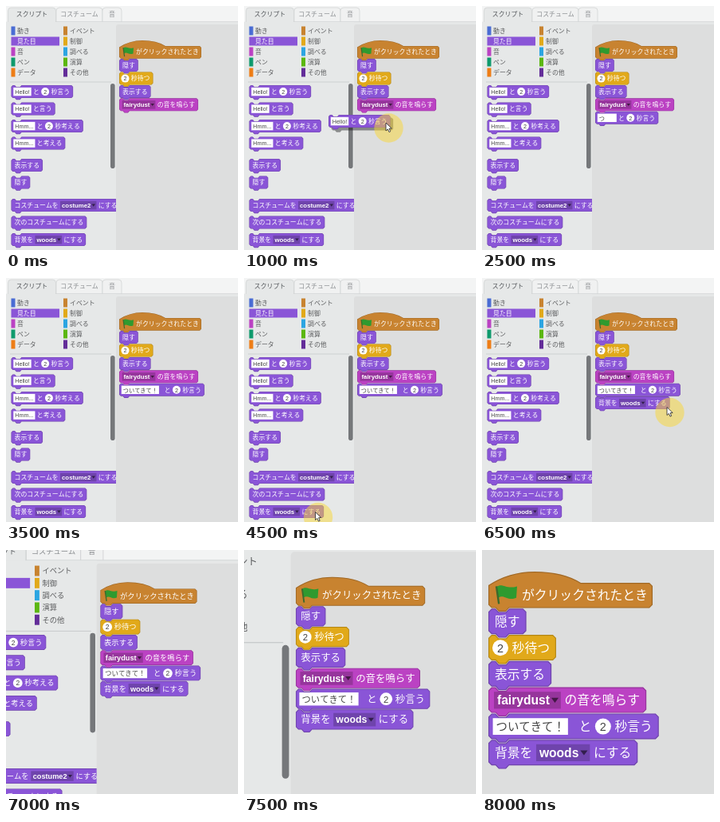
Animation of 291 by 305 pixels, one loop 9500 ms. Source, as an HTML page with a canvas:

```html
<!DOCTYPE html>
<html lang="ja">
<head>
<meta charset="utf-8">
<style>
html, body { margin: 0; width: 100%; height: 100%; overflow: hidden; background: #dddede; }
canvas { display: block; width: 291px; height: 305px; }
</style>
</head>
<body>
<canvas id="stage"></canvas>
<script>
const W = 291, H = 305, STEP = 500, LOOP = 9500;
const canvas = document.getElementById('stage');
const ctx = canvas.getContext('2d');
const dpr = window.devicePixelRatio || 1;
canvas.width = W * dpr;
canvas.height = H * dpr;

const JP = '"Liberation Sans", "Noto Sans CJK JP", "Noto Sans CJK", sans-serif';
const FONT = { label: `500 7.9px ${JP}`, menu: `bold 7.8px ${JP}`, input: `7.2px ${JP}`, ui: `7.9px ${JP}` };
const COLOR = {
  motion: '#4a6cd4', looks: '#8a55d7', sound: '#bb42c3', pen: '#0e9a6c', data: '#ee7d16',
  events: '#c88330', control: '#e1a91a', sensing: '#2ca5e2', operators: '#5cb712', more: '#632d99'
};
const PITCH = 16.4, GAP = 2.3;

function write(str, x, cy, font, color) {
  ctx.font = font;
  ctx.fillStyle = color;
  ctx.fillText(str, x, cy + 2.8);
  return ctx.measureText(str).width;
}

function widthOf(str, font) {
  ctx.font = font;
  return ctx.measureText(str).width;
}

function rect(x, y, w, h, color) {
  ctx.fillStyle = color;
  ctx.fillRect(x, y, w, h);
}

function pill(x, y, w, h, r, color) {
  ctx.beginPath();
  ctx.roundRect(x, y, w, h, r);
  ctx.fillStyle = color;
  ctx.fill();
}

// Block parts: each has a width and a way to draw itself.
const text = s => ({
  inset: 4,
  width: () => widthOf(s, FONT.label),
  draw: (x, cy) => write(s, x, cy, FONT.label, '#fff')
});

const num = s => ({
  inset: 2.5,
  width: () => 10,
  draw(x, cy) {
    pill(x, cy - 5, 10, 10, 5, '#fff');
    write(s, x + 3, cy, FONT.input, '#444');
  }
});

const menu = s => ({
  inset: 3.5,
  width: () => widthOf(s, FONT.menu) + 9,
  draw(x, cy) {
    const w = this.width();
    rect(x, cy - 5.3, w, 10.6, 'rgba(0,0,0,.2)');
    write(s, x + 2, cy, FONT.menu, '#fff');
    ctx.beginPath();
    ctx.moveTo(x + w - 6, cy - 1.5);
    ctx.lineTo(x + w - 1.4, cy - 1.5);
    ctx.lineTo(x + w - 3.7, cy + 1.6);
    ctx.fillStyle = 'rgba(0,0,0,.55)';
    ctx.fill();
  }
});

const field = (s, fixed, extra = 0) => ({
  inset: 2.8,
  box: () => fixed || widthOf(s, FONT.input) + 4,
  width() { return this.box() + extra; },
  draw(x, cy) {
    rect(x, cy - 5.2, this.box(), 10.4, '#fff');
    write(s, x + 2, cy, FONT.input, '#444');
  }
});

function blockPath(x, y, w, h, hat) {
  ctx.beginPath();
  if (hat) {
    ctx.moveTo(x, y + 1.5);
    ctx.quadraticCurveTo(x + 13, y - 7, x + 29, y - 7);
    ctx.quadraticCurveTo(x + 47, y - 7, x + 58, y);
  } else {
    ctx.moveTo(x, y + 2);
    ctx.lineTo(x + 2, y);
    ctx.lineTo(x + 4.5, y);
    ctx.lineTo(x + 6.5, y + 2.2);
    ctx.lineTo(x + 11, y + 2.2);
    ctx.lineTo(x + 13, y);
  }
  ctx.lineTo(x + w - 2, y);
  ctx.lineTo(x + w, y + 2);
  ctx.lineTo(x + w, y + h - 2);
  ctx.lineTo(x + w - 2, y + h);
  ctx.lineTo(x + 13, y + h);
  ctx.lineTo(x + 11, y + h + 2.2);
  ctx.lineTo(x + 6.5, y + h + 2.2);
  ctx.lineTo(x + 4.5, y + h);
  ctx.lineTo(x + 2, y + h);
  ctx.lineTo(x, y + h - 2);
  ctx.closePath();
}

function paintShape(color) {
  ctx.fillStyle = color;
  ctx.fill();
  ctx.save();
  ctx.clip();
  ctx.strokeStyle = 'rgba(0,0,0,.2)';
  ctx.lineWidth = 1.2;
  ctx.stroke();
  ctx.restore();
}

function block(x, y, parts, color = COLOR.looks, lifted = false) {
  const w = parts.reduce((sum, p) => sum + p.width() + GAP, parts[0].inset + 4 - GAP);
  const h = 16;
  if (lifted) {
    blockPath(x + 3.5, y + 3.5, w, h);
    ctx.fillStyle = 'rgba(0,0,0,.4)';
    ctx.fill();
  }
  blockPath(x, y, w, h);
  paintShape(color);
  let px = x + parts[0].inset;
  for (const p of parts) {
    p.draw(px, y + 8.1);
    px += p.width() + GAP;
  }
}

function hatBlock(x, y) {
  blockPath(x, y, 103, 15.8, true);
  paintShape(COLOR.events);
  ctx.save();
  ctx.translate(x + 5, y + 1.2);
  ctx.beginPath();
  ctx.moveTo(0, 1.4);
  ctx.bezierCurveTo(4, -1.6, 6, 3.2, 13, 1);
  ctx.lineTo(12.5, 8.2);
  ctx.bezierCurveTo(7, 10.4, 5, 5.8, 1.4, 8);
  ctx.closePath();
  ctx.fillStyle = '#2f9a2f';
  ctx.fill();
  ctx.beginPath();
  ctx.moveTo(0, 1);
  ctx.lineTo(1.6, 12);
  ctx.strokeStyle = '#3c6a2c';
  ctx.lineWidth = 1.2;
  ctx.stroke();
  ctx.restore();
  write('がクリックされたとき', x + 21, y + 7.6, FONT.label, '#fff');
}

const sayFor = f => [f, text('と'), num('2'), text('秒言う')];
const HELLO = sayFor(field('Hello!'));
const WOODS = [text('背景を'), menu('woods'), text('にする')];
const PALETTE = [
  [99, HELLO],
  [120.5, [field('Hello!'), text('と言う')]],
  [142, [field('Hmm...'), text('と'), num('2'), text('秒考える')]],
  [163.5, [field('Hmm...'), text('と考える')]],
  [191, [text('表示する')]],
  [212.5, [text('隠す')]],
  [241, [text('コスチュームを'), menu('costume2'), text('にする')]],
  [262.5, [text('次のコスチュームにする')]],
  [284, WOODS]
];
const CATEGORIES = [
  ['動き', 'motion', 'イベント', 'events'],
  ['見た目', 'looks', '制御', 'control'],
  ['音', 'sound', '調べる', 'sensing'],
  ['ペン', 'pen', '演算', 'operators'],
  ['データ', 'data', 'その他', 'more']
];

function tab(x, w, label, active) {
  ctx.beginPath();
  ctx.roundRect(x, 2, w, 19, [4, 4, 0, 0]);
  ctx.fillStyle = active ? '#e6e8e8' : '#f0f1f1';
  ctx.fill();
  ctx.strokeStyle = '#cfd1d2';
  ctx.lineWidth = 0.7;
  ctx.stroke();
  const tw = widthOf(label, FONT.ui);
  write(label, x + (w - tw) / 2, 10.5, FONT.ui, active ? '#55585c' : '#8c8f92');
}

function editor() {
  rect(0, 0, W, H, '#f3f4f4');
  tab(63, 58, 'コスチューム');
  tab(121, 24, '音');
  rect(0, 19.6, W, H, '#e6e8e8');
  rect(62, 19.4, W, 0.7, '#cfd1d2');
  tab(2.5, 60, 'スクリプト', true);
  rect(0, 20, 138, H, '#e6e8e8');
  pill(138, 23, W, H, 3, '#dddede');

  CATEGORIES.forEach(([left, lc, right, rc], i) => {
    const y = 31 + i * 13, on = lc === 'looks';
    rect(6.5, y - 5.5, on ? 60.5 : 5, 11, COLOR[lc]);
    rect(72, y - 5.5, 5, 11, COLOR[rc]);
    write(left, 14, y, FONT.ui, on ? '#fff' : '#5c5d5f');
    write(right, 80, y, FONT.ui, '#5c5d5f');
  });
  rect(5, 94.6, 127, 0.8, '#c6c8c9');

  ctx.save();
  ctx.beginPath();
  ctx.rect(0, 95, 138, 210);
  ctx.clip();
  for (const [y, parts] of PALETTE) block(6.5, y, parts);
  ctx.restore();
  pill(131, 97, 5.6, 106, 2.8, '#75777a');
}

function script(say, woods) {
  const x = 142, rows = [
    [[text('隠す')]],
    [[num('2'), text('秒待つ')], COLOR.control],
    [[text('表示する')]],
    [[menu('fairydust'), text('の音を鳴らす')], COLOR.sound]
  ];
  if (say) rows.push([say]);
  if (woods) rows.push([WOODS]);
  for (let i = rows.length - 1; i >= 0; i--) block(x, 66.1 + i * PITCH, ...rows[i]);
  hatBlock(x, 50);
}

function pointer(x, y) {
  ctx.beginPath();
  ctx.arc(x, y, 18.2, 0, Math.PI * 2);
  ctx.fillStyle = 'rgba(250,216,55,.5)';
  ctx.fill();
  ctx.beginPath();
  const outline = [[0, 0], [0, 10], [2.3, 7.9], [4, 11.6], [5.7, 10.8], [4.1, 7.2], [7.2, 7]];
  for (const [dx, dy] of outline) ctx.lineTo(x - 3.5 + dx, y - 6.5 + dy);
  ctx.closePath();
  ctx.fillStyle = '#fff';
  ctx.fill();
  ctx.strokeStyle = '#222';
  ctx.lineWidth = 0.8;
  ctx.stroke();
}

const typed = s => sayFor(field(s, 24));
const DONE = sayFor(field('ついてきて！', 0, 4.5));
const grabHello = { parts: HELLO, dx: 75.5, dy: 16.5 };
const grabWoods = { parts: WOODS, dx: 86.5, dy: 15 };

// One scene per half second; the last one holds until the loop ends.
const SCENES = [
  {},
  { at: [82.5, 115.5] },
  { at: [181.5, 152.5], drag: grabHello },
  { at: [209.5, 142.5], drag: grabHello },
  { at: [165, 146.5], say: HELLO },
  { say: typed('つ') },
  { say: typed('ついて') },
  { say: DONE },
  { say: DONE, at: [96.5, 299] },
  { say: DONE, at: [93, 299] },
  { say: DONE, at: [203.5, 243.5], drag: grabWoods },
  { say: DONE, at: [225.5, 199.5], drag: grabWoods },
  { say: DONE, at: [235.5, 163.5], drag: grabWoods },
  { say: DONE, at: [235.5, 168], woods: true },
  { say: DONE, woods: true, zoom: 0.3 },
  { say: DONE, woods: true, zoom: 0.73 },
  { say: DONE, woods: true, zoom: 1 }
];

function render(scene) {
  const u = scene.zoom || 0, s = dpr / (1 - u / 2);
  ctx.setTransform(s, 0, 0, s, -s * 138 * u, -s * 29.5 * u);
  editor();
  script(scene.say, scene.woods);
  if (scene.drag) {
    const { parts, dx, dy } = scene.drag;
    block(scene.at[0] - dx, scene.at[1] - dy, parts, COLOR.looks, true);
  }
  if (scene.at) pointer(...scene.at);
}

const start = performance.now();
function tick() {
  const t = (performance.now() - start) % LOOP;
  render(SCENES[Math.min(Math.floor(t / STEP), SCENES.length - 1)]);
  requestAnimationFrame(tick);
}
tick();
</script>
</body>
</html>
```
